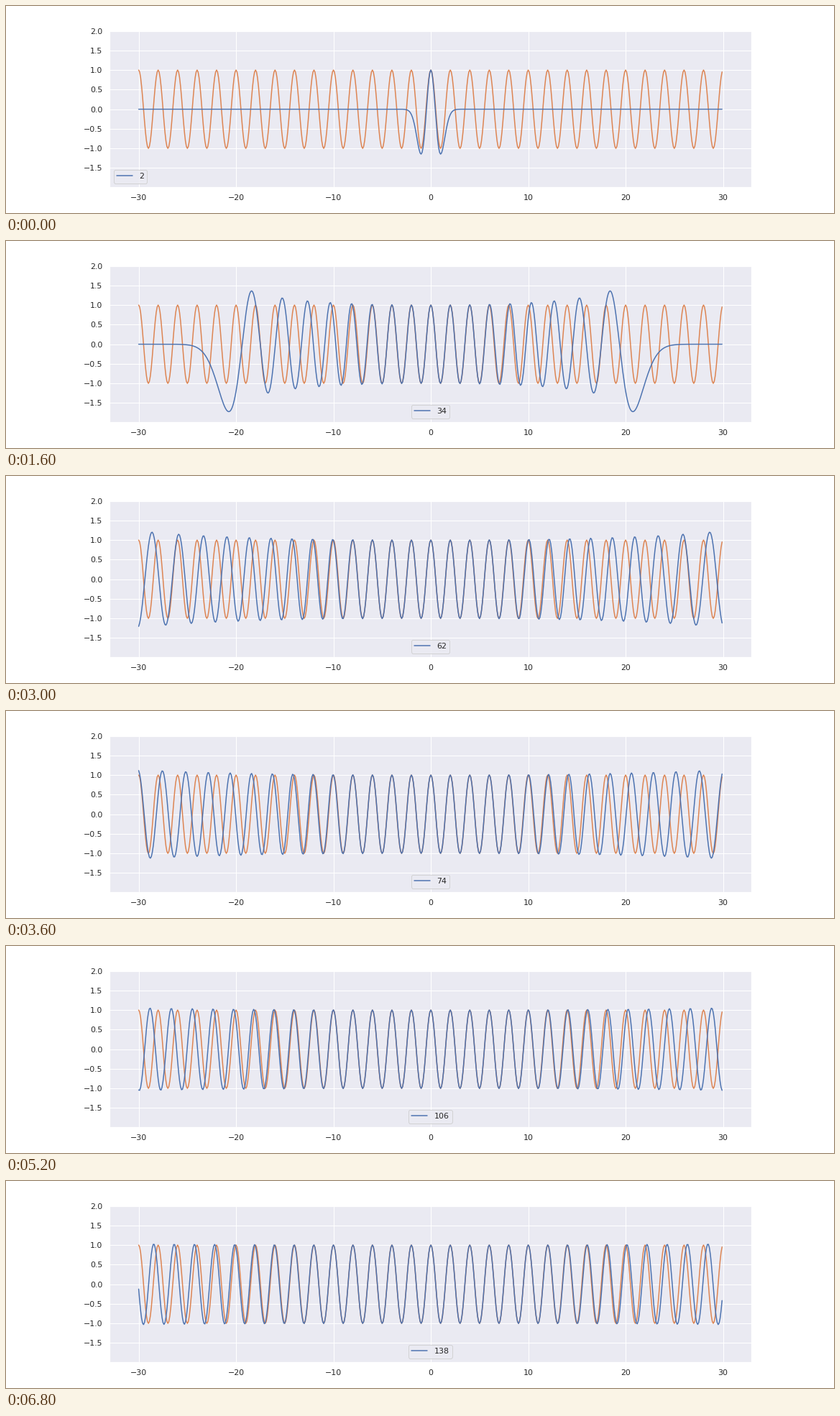
Write a matplotlib script that moves like this. It is 1152 px wide and 288 px high and loops after 6.9 s.

```python
import numpy as np
import matplotlib.pyplot as plt
from matplotlib.animation import FuncAnimation

FRAMES, INTERVAL = 69, 100
BLUE, ORANGE = "#4C72B0", "#DD8452"
PANEL, INK = "#EAEAF2", ".15"

plt.rcParams.update({
    "font.family": "DejaVu Sans",
    "font.size": 11,
    "text.color": INK,
    "axes.facecolor": PANEL,
    "axes.edgecolor": "white",
    "axes.linewidth": 1.25,
    "axes.axisbelow": True,
    "axes.grid": True,
    "grid.color": "white",
    "grid.linewidth": 1,
    "lines.linewidth": 1.5,
    "lines.solid_capstyle": "round",
    "patch.linewidth": 1,
    "legend.fontsize": 11,
})
for axis, side in (("xtick", "bottom"), ("ytick", "left")):
    plt.rcParams.update({
        f"{axis}.{side}": False,
        f"{axis}.major.size": 6,
        f"{axis}.major.pad": 3.5,
        f"{axis}.labelsize": 11,
        f"{axis}.color": INK,
    })


def oscillator(n, x):
    """Even oscillator state n, scaled to look like cos(pi x) near zero."""
    y = np.pi * x / np.sqrt(2 * n)
    prev, cur = np.zeros_like(y), np.exp(-y**2 / 2)
    for k in range(n):
        step = np.sqrt(2 / (k + 1)) * y * cur - np.sqrt(k / (k + 1)) * prev
        prev, cur = cur, step
    return cur / cur[len(x) // 2]


x = np.arange(-30, 30, 0.1)
levels = [2 + 2 * i for i in range(FRAMES)]
waves = [oscillator(n, x) for n in levels]


def padded(values):
    lo, hi = np.min(values), np.max(values)
    pad = 0.05 * (hi - lo)
    return lo - pad, hi + pad


fig, ax = plt.subplots(figsize=(16, 4), dpi=72)
fig.subplots_adjust(left=0.125, right=0.9, bottom=0.125, top=0.88)
ax.plot(x, np.cos(np.pi * x), color=ORANGE)
wave, = ax.plot(x, waves[0], color=BLUE)
ax.set_xlim(padded(x))
ax.set_ylim(padded(waves))


def update(i):
    n = levels[i]
    wave.set_ydata(waves[i])
    # only the narrow one-digit box fits beside the tallest waves
    loc = "lower left" if n < 10 else "lower center"
    ax.legend([wave], [str(n)], loc=loc)
    return []


anim = FuncAnimation(fig, update, frames=FRAMES, interval=INTERVAL,
                     repeat=True, repeat_delay=0, blit=False)
plt.show()
```
